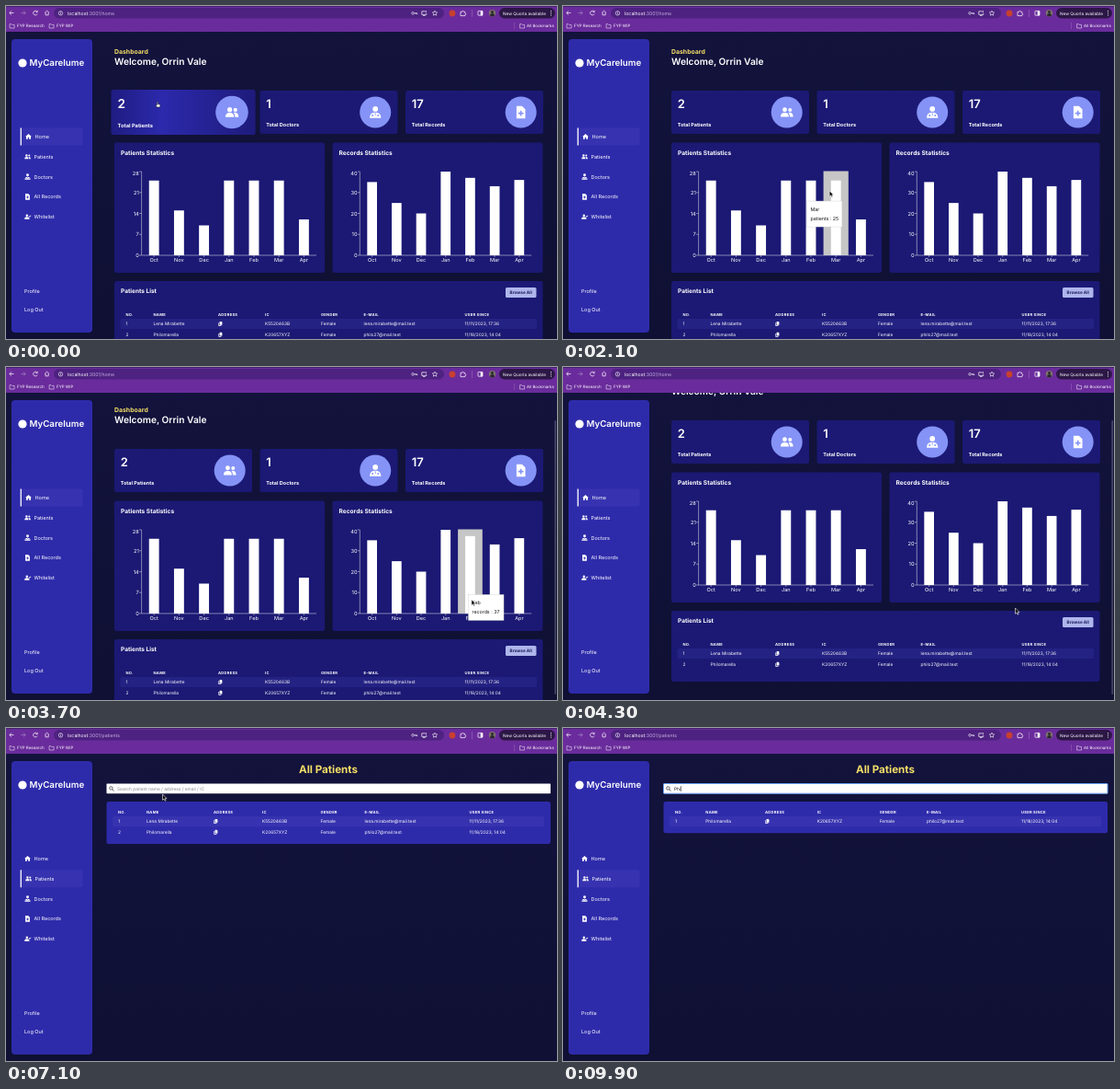
An HTML page that plays this animation: 600x362 px, repeating every 10000 ms.

```html
<!DOCTYPE html>
<html lang="en">
<head>
<meta charset="utf-8">
<title>Dashboard</title>
<style>
  html, body { margin: 0; height: 100%; overflow: hidden; background: #11123a; }
  svg { display: block; width: 100vw; height: 100vh; }
  text { font-family: Inter, "Open Sans", sans-serif; text-rendering: geometricPrecision; white-space: pre; }
</style>
</head>
<body>
<svg id="stage" viewBox="0 0 600 362"></svg>
<script>
const LOOP = 10000;
const PANEL = '#1b1974', BLUE = '#2e2bab', STRIPE = '#3733b0', YELLOW = '#f6df67', BAR = '#6a2c9c';

// Drawing helpers; text y is the middle of the capitals.
const text = (s, x, y, size, { w = 400, fill = '#fff', anchor = 'start', ls = 0, id = '' } = {}) =>
  `<text ${id && `id="${id}"`} x="${x}" y="${y + size * .36}" font-size="${size}" font-weight="${w}" fill="${fill}" text-anchor="${anchor}" letter-spacing="${ls}">${s}</text>`;
const rect = (x, y, w, h, fill, r = 0, extra = '') =>
  `<rect x="${x}" y="${y}" width="${w}" height="${h}" rx="${r}" fill="${fill}" ${extra}/>`;
const circle = (x, y, r, fill, extra = '') => `<circle cx="${x}" cy="${y}" r="${r}" fill="${fill}" ${extra}/>`;
const line = (d, stroke = '#fff', w = .7, extra = '') =>
  `<path d="${d}" fill="none" stroke="${stroke}" stroke-width="${w}" ${extra}/>`;
const group = (id, body, extra = '') => `<g id="${id}" ${extra}>${body}</g>`;
const dot = (x, y, r) => `M${x - r} ${y}a${r} ${r} 0 1 0 ${2 * r} 0a${r} ${r} 0 1 0 ${-2 * r} 0z`;

const ICONS = {
  home: 'M0-5.5L6 0H4.5V5H1.2V1.5H-1.2V5H-4.5V0H-6Z',
  people: dot(-2, -2.4, 2.2) + 'M-6 4.5q0-4 4-4t4 4z' + dot(3.2, -2.2, 1.8) + 'M2.6 .3q3.6 0 3.6 4.2H3q0-2.5-1.4-4z',
  doctor: dot(0, -3.2, 2.6) + 'M-5.5 5.5q0-5.3 5.5-5.3t5.5 5.3z M-.6 1l.6 3 .6-3z' + dot(2.7, 3.2, .9) + dot(-2.7, 3.2, .9),
  file: 'M-4.3-6H1L4.3-2.8V6H-4.3Z M-.7-1.5H.7V.3H2.5V1.7H.7V3.5H-.7V1.7H-2.5V.3H-.7Z',
  check: dot(-1.2, -2.6, 2.2) + 'M-6 4.5q0-4.2 4.8-4.2t4.8 4.2z M2-1l1-1 1 1 2-2 1 1-3 3z',
  copy: 'M-1.6-5H2.4L4-3.3V2.4H-1.6Z M-4-2.4H-2.6V3.4H2V5H-4Z',
};
const icon = (name, x, y, s) =>
  `<path d="${ICONS[name]}" transform="translate(${x} ${y}) scale(${s})" fill="#fff" fill-rule="evenodd"/>`;

// Browser frame
const folder = x => line(`M${x - 2.4} 19.6h1.8l.7.8h2.5v3.6h-5z`, '#e6dcf2', .6);
const browser = () =>
  rect(0, 0, 600, 28, BAR) + rect(0, 0, 600, 1, '#43206d') + rect(52, 2, 425, 11.5, '#4d2280', 5.7) +
  line('M8.5 7.5H4M6 5.3L3.8 7.5 6 9.7') + line('M16.5 7.5H21M19 5.3L21.2 7.5 19 9.7', '#a487c4') +
  line('M33.9 6.3a2.3 2.3 0 1 0 .2 2.2M34.2 4.8v1.8h-1.8') + line('M42.3 7.2l2.3-2 2.3 2M43 7v2.8h3.2V7') +
  circle(59.5, 7.8, 2.2, 'none', 'stroke="#fff" stroke-width=".6"') + line('M59.5 7.4v1.5M59.5 6.3v.5') +
  circle(443, 7.8, 1.3, 'none', 'stroke="#fff" stroke-width=".6"') + line('M444.3 7.8h3.4v1.3M446.2 7.8v1') +
  line('M456.5 5.8h-3.7v3.6h5V8M454 10.4h2.6M457.3 5v2.4') +
  line('M467 5.1l.8 1.7 1.9.2-1.4 1.3.4 1.9-1.7-1-1.7 1 .4-1.9-1.4-1.3 1.9-.2z', '#fff', .6) +
  circle(486, 8, 3.4, '#c8402f') +
  line('M495 6.3h1.6a.9.9 0 0 1 1.8 0h1.4v1.5a.9.9 0 0 1 0 1.8v1H495z', '#fff', .7) +
  rect(507, 4, .7, 8, '#9064bb') + rect(514, 5.4, 5, 4.8, 'none', .4, 'stroke="#fff" stroke-width=".7"') + rect(516.7, 5.4, 2.3, 4.8, '#fff') +
  circle(529.5, 7.7, 3.7, '#7a7468') + circle(529.5, 6.5, 1.4, '#2a2630') + `<path d="M527 10.4q0-2.4 2.5-2.4t2.5 2.4q-2.5 1.8-5 0z" fill="#2a2630"/>` +
  rect(537, 2, 61, 11.5, '#2c1746', 5.7) + text('New Quorla available', 541, 7.9, 4.7) +
  [5.6, 7.8, 10].map(y => circle(593.5, y, .6, '#fff')).join('') +
  text('', 67, 7.9, 5.2, { id: 'url' }) +
  folder(6.5) + text('FYP Research', 12, 21.8, 4.5) + folder(49.5) + text('FYP WIP', 55, 21.8, 4.5) +
  rect(553, 18, .6, 7, '#8f5cba') + folder(562) + text('All Bookmarks', 567, 21.8, 4.4);

// Sidebar
const MENU = [['home', 'Home'], ['people', 'Patients'], ['doctor', 'Doctors'], ['file', 'All Records'], ['check', 'Whitelist']];
const menu = active => MENU.map(([name, label], i) => {
  const y = 142 + i * 21.8, on = i === active;
  return (on ? rect(16, y - 9.5, 67.5, 19, STRIPE, 2) + rect(15.6, y - 9.5, 1.3, 19, '#fff') : '') +
    icon(name, 23.5 + on, y, .56) + text(label, 30.5 + on, y, 5.5);
}).join('');
const sidebar = () => rect(6, 36, 88, 319, BLUE, 4) + circle(18, 62, 4.6, '#fff') +
  text('MyCarelume', 25.5, 62, 9.7, { w: 600 }) + text('Profile', 20, 310, 5.5) + text('Log Out', 20, 330, 5.5);

// Tables
const HEADS = ['NO.', 'NAME', 'ADDRESS', 'IC', 'GENDER', 'E-MAIL', 'USER SINCE'];
const ROWS = [
  ['Lena Mirabette', '', 'K5520463B', 'Female', 'lena.mirabette@mail.test', '11/11/2023, 17:36'],
  ['Philomarella', '', 'K20657XYZ', 'Female', 'philo27@mail.test', '11/18/2023, 14:04'],
];
const table = (cols, y, left, right, rows, stripe) =>
  HEADS.map((h, i) => text(h, cols[i], y, 4.1, { w: 700, ls: .25 })).join('') +
  rows.map((row, r) => {
    const ry = y + 10.2 + r * 11.7;
    return (r ? '' : rect(left, ry - 5.5, right - left, 11, stripe, 1.5)) +
      [r + 1, ...row].map((v, i) => i === 2 ? icon('copy', cols[2] + 2.4, ry, .5) : text(v, cols[i], ry, 4.8)).join('');
  }).join('');

// Dashboard
const MONTHS = ['Oct', 'Nov', 'Dec', 'Jan', 'Feb', 'Mar', 'Apr'];
const TOP = 180, BASE = 271;
const CHARTS = [
  { key: 'patients', title: 'Patients Statistics', panel: 118, x: 147.6, step: 27.2, max: 28, data: [25, 15, 10, 25, 25, 25, 12] },
  { key: 'records', title: 'Records Statistics', panel: 355.5, x: 385.3, step: 26.7, max: 40, data: [35, 25, 20, 40, 37, 33, 36] },
];
const chart = ({ key, title, panel, x, step, max, data }) => {
  const grey = '#c9c9dc';
  let s = rect(panel, 148.5, 229, 141.5, PANEL, 2.5) + text(title, panel + 7, 159.5, 6.6, { w: 700 }) +
    rect(0, TOP - .5, step, BASE - TOP + .5, '#c6c6c6', 0, `id="band-${key}"`) +
    line(`M${x} ${TOP}V${BASE}H${x + 7 * step}`, grey, .6);
  for (let i = 0; i < 5; i++) {
    const y = BASE - i * (BASE - TOP) / 4;
    s += line(`M${x - 2.5} ${y}h2.5`, grey, .6) + text(max * i / 4, x - 2.8, Math.max(y, 182), 5.7, { anchor: 'end' });
  }
  data.forEach((v, i) => {
    const cx = x + (i + .5) * step, h = v / max * (BASE - TOP);
    s += rect(cx - step * .2, BASE - h, step * .4, h, '#fff') + line(`M${cx} ${BASE}v2`, grey, .6) +
      text(MONTHS[i], cx, 276.2, 5.6, { anchor: 'middle' });
  });
  return s;
};
const card = (x, n, label, name) => rect(x, 92, 150, 47, PANEL, 2.5) +
  (x === 118 ? rect(x, 92, 150, 47, 'url(#glow)', 2.5, 'id="glowing"') : '') +
  text(n, x + 6.7, 106.5, 13, { w: 600 }) + text(label, x + 6.7, 129, 5.5, { w: 700 }) +
  circle(x + 125.7, 115.5, 17, '#8593f6') + icon(name, x + 125.7, 115.5, 1.12);
const dashboard = () =>
  text('Dashboard', 118, 49.5, 6.9, { w: 700, fill: YELLOW }) + text('Welcome, Orrin Vale', 118, 60, 10.2, { w: 600 }) +
  card(276.5, 1, 'Total Doctors', 'doctor') + card(435, 17, 'Total Records', 'file') +
  CHARTS.map(chart).join('') + group('card', card(118, 2, 'Total Patients', 'people')) +
  rect(118, 299, 466.5, 77, PANEL, 2.5) + text('Patients List', 125, 310, 6.5, { w: 700 }) +
  rect(544, 306, 33.5, 11, '#aeb6ec', 1.5) + text('Browse All', 560.7, 311.5, 4.7, { w: 700, fill: '#1b1a5c', anchor: 'middle' }) +
  table([130.5, 160.5, 231, 282, 343, 389.5, 499.5], 335.3, 124.5, 578, ROWS, '#242283') +
  group('tip', rect(0, 0, 38.5, 28, '#fff', 0, 'stroke="#ccc" stroke-width=".4"') +
    text('', 4, 8.8, 5.3, { fill: '#111', id: 'tip-month' }) + text('', 4, 18.8, 5.3, { fill: '#111', id: 'tip-value' }));

// Patients page
const patients = () =>
  text('All Patients', 351, 45, 11.6, { w: 700, fill: YELLOW, anchor: 'middle' }) +
  rect(109.5, 60.5, 483.5, 10.7, '#fff', .6, 'id="search"') +
  circle(114.4, 65.4, 1.7, 'none', 'stroke="#222" stroke-width=".7"') + line('M115.7 66.7l1.7 1.7', '#222', .8) +
  text('', 121, 66, 4.8, { id: 'query' }) + rect(0, 63, .5, 6, '#111', 0, 'id="caret"') +
  group('full', rect(109.5, 80, 483.5, 46, BLUE, 2.5) +
    table([122, 153, 226, 279, 342.5, 390.5, 504.5], 91.3, 116, 586, ROWS, STRIPE)) +
  group('filtered', rect(109.5, 80, 483.5, 34.3, BLUE, 2.5) +
    table([122, 155.3, 220, 276.7, 344.7, 396, 499], 91.3, 116, 586, ROWS.slice(1), STRIPE));

const pointer =
  group('arrow', `<path d="M0 0V6.3L1.5 5 2.5 7.2 3.6 6.7 2.6 4.6H4.5Z" fill="#000" stroke="#fff" stroke-width=".6"/>`) +
  group('hand', `<path d="M-.6-2.4q.6-.8 1.1 0V-.4L2.6.2q.6.2.4 1L2.5 3H-.5L-2 .9q.2-.9 1.4-.1Z" fill="#fff" stroke="#111" stroke-width=".5"/>`) +
  group('beam', line('M-1.2-3q1.2 0 1.2 1V2q0 1-1.2 1M1.2-3Q0-3 0-2V2Q0 3 1.2 3', '#333', .6));

document.getElementById('stage').innerHTML =
  `<defs><linearGradient id="glow"><stop offset="0" stop-color="#1f1c82"/><stop offset=".35" stop-color="#2c29ac"/><stop offset="1" stop-color="#1e1b7c"/></linearGradient>
   <linearGradient id="night" x2="0" y2="1"><stop offset="0" stop-color="#13133d"/><stop offset="1" stop-color="#0f1033"/></linearGradient></defs>` +
  rect(0, 0, 600, 362, 'url(#night)') + group('home', dashboard()) + group('patients', patients()) +
  rect(597.3, 58, 1.8, 298, '#77778c', .9, 'id="scrollbar"') +
  sidebar() + group('menu-home', menu(0)) + group('menu-patients', menu(1)) + browser() + group('pointer', pointer);

const $ = id => document.getElementById(id);
const show = (id, on) => { $(id).style.display = on ? '' : 'none'; };
const move = (id, x, y) => $(id).setAttribute('transform', `translate(${x} ${y})`);
const clamp = v => Math.max(0, Math.min(1, v));
const ease = v => (v = clamp(v), v * v * (3 - 2 * v));

// Pointer path: time, x, y
const PATH = [
  [0, 165, 107], [300, 166, 112], [800, 174, 150], [1060, 182, 178], [1100, 183.5, 197], [1500, 200, 206],
  [2200, 305, 200], [2300, 305, 200], [2780, 420, 196], [3100, 528, 221], [3400, 528, 225], [3800, 500, 262],
  [4300, 492.5, 262], [4500, 492.5, 262], [4900, 550, 277], [5600, 550, 277], [6700, 172, 76],
  [7100, 170.5, 72], [7300, 170.5, 72], [8300, 150, 66],
];
function cursor(t) {
  const i = PATH.findIndex(p => p[0] > t);
  if (i < 1) return PATH[i < 0 ? PATH.length - 1 : 0].slice(1);
  const [a, b] = [PATH[i - 1], PATH[i]], k = (t - a[0]) / (b[0] - a[0]);
  return [a[1] + (b[1] - a[1]) * k, a[2] + (b[2] - a[2]) * k];
}
const scroll = t => 34 * ease((t - 3600) / 550);

function hovered(t) {
  const [x, y] = cursor(t), py = y + scroll(t);
  if (py < TOP || py > BASE || t > 5000) return null;
  const c = CHARTS.find(c => x >= c.x && x < c.x + 7 * c.step);
  return c ? { c, y: py, i: Math.floor((x - c.x) / c.step) } : null;
}
function tipTarget(t, c) {
  const h = hovered(t);
  if (!h || h.c !== c) return [c.panel + 7, 174.8];
  const cx = c.x + (h.i + .5) * c.step;
  return [cx + 48.5 > c.x + 7 * c.step ? cx - 48.5 : cx + 10, h.y + 10];
}

function draw(t) {
  const listing = t >= 5100, typed = t < 9700 ? 0 : Math.min(3, 1 + Math.floor((t - 9700) / 100));
  const [x, y] = cursor(t), hit = hovered(t), focus = t >= 8300;

  show('home', !listing); show('menu-home', !listing);
  show('patients', listing); show('menu-patients', listing);
  $('url').innerHTML = `localhost:<tspan fill="#c5aee0">3001/${t < 5300 ? 'home' : 'patients'}</tspan>`;
  move('home', 0, -scroll(t));
  $('scrollbar').setAttribute('opacity', .5 * clamp((t - 3550) / 100) * clamp((4900 - t) / 300));

  const lift = 1 - ease((t - 600) / 200), k = 1 + .045 * lift;
  $('card').setAttribute('transform', `translate(193 115.5) scale(${k}) translate(-193 -115.5)`);
  $('glowing').setAttribute('opacity', lift);

  for (const c of CHARTS) {
    const on = hit && hit.c === c;
    show('band-' + c.key, on);
    if (on) $('band-' + c.key).setAttribute('x', c.x + hit.i * c.step);
  }
  show('tip', hit);
  if (hit) {
    // The tooltip trails the pointer: average its recent targets.
    let tx = 0, ty = 0;
    for (let i = 0; i < 8; i++) {
      const [ax, ay] = tipTarget(t - i * 40, hit.c);
      tx += ax / 8; ty += ay / 8;
    }
    move('tip', tx, ty);
    $('tip-month').textContent = MONTHS[hit.i];
    $('tip-value').textContent = `${hit.c.key} : ${hit.c.data[hit.i]}`;
  }

  const query = $('query');
  query.textContent = typed ? 'Phi'.slice(0, typed) : 'Search patient name / address / email / IC';
  query.setAttribute('fill', typed ? '#111' : '#85858f');
  $('search').setAttribute('stroke', focus ? '#6ea3f5' : 'none');
  show('caret', focus && (typed || (t - 8300) % 1000 < 500));
  $('caret').setAttribute('x', typed && listing ? 121.3 + query.getComputedTextLength() : 121);
  show('full', typed < 2); show('filtered', typed >= 2);

  const hand = t < 700 || (t > 4850 && t < 5100), beam = listing && y > 60.5 && y < 71.2;
  show('pointer', !typed);
  show('hand', hand); show('beam', beam); show('arrow', !hand && !beam);
  move('pointer', x, y);
}

function tick() {
  draw(performance.now() % LOOP);
  requestAnimationFrame(tick);
}
tick();
</script>
</body>
</html>
```
